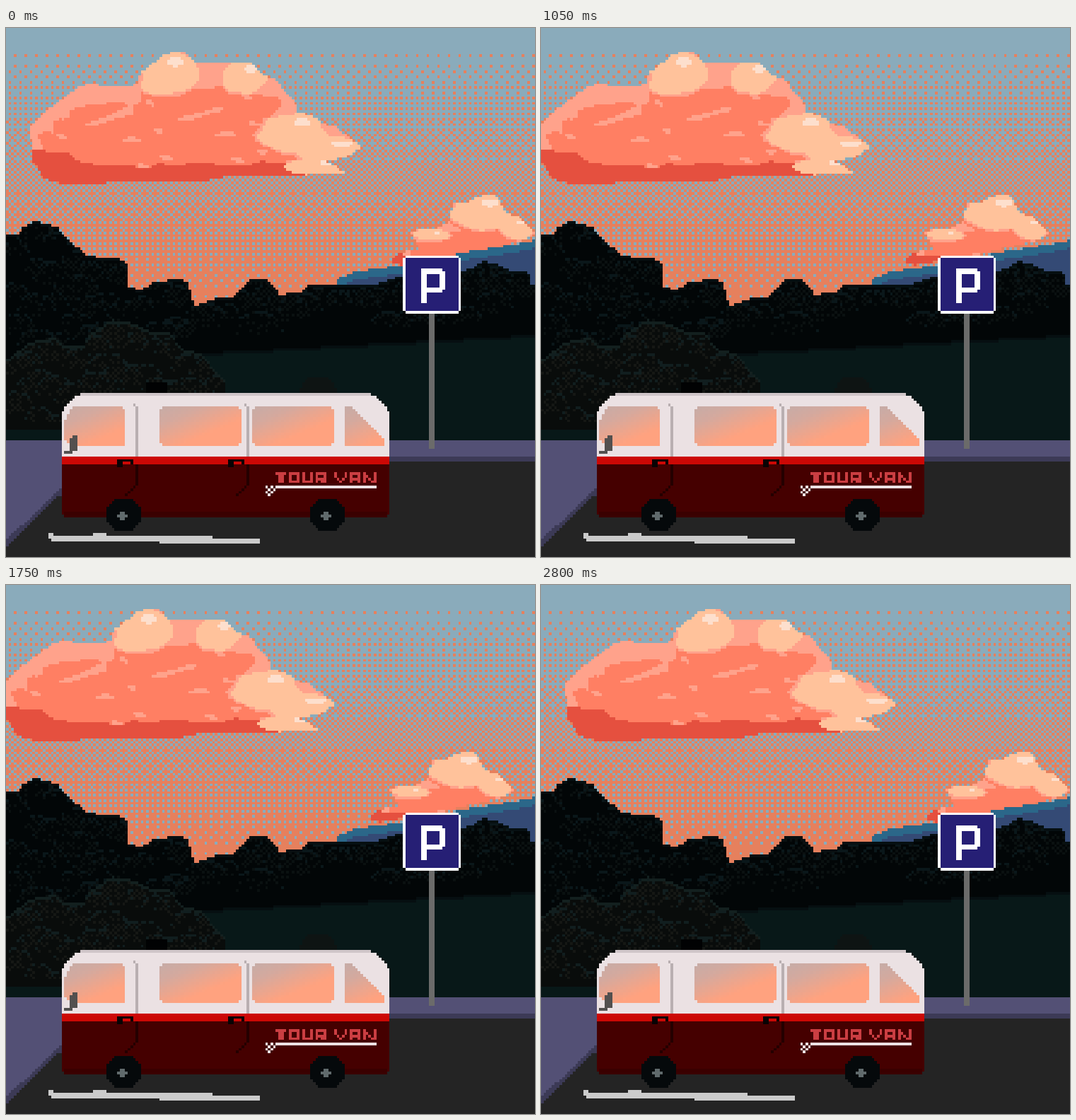
These frames come from a looping animation (748x748 px, 3150 ms). An HTML page with a canvas:

```html
<!DOCTYPE html>
<html lang="en">
<head>
<meta charset="utf-8">
<title>Tour van at dusk</title>
<style>
html, body { margin: 0; width: 100%; height: 100%; overflow: hidden; background: #8aabbb; }
canvas { display: block; width: 748px; height: 748px; image-rendering: pixelated; }
</style>
</head>
<body>
<canvas id="stage" width="200" height="200"></canvas>
<script>
const ctx = document.getElementById('stage').getContext('2d');
const SIZE = 200, UNIT = 3.74, STEP = 350, STEPS = 9;
const CORAL = '#ff7f63', SALMON = '#ffa28b', RED = '#e5503f', CREAM = '#ffc29b', PALE = '#fddfcd';

const snap = v => Math.round(v / UNIT);
const points = path => path.split(' ').map(p => p.split(',').map(v => v / UNIT));

function rect(x, y, w, h, color) {
  ctx.fillStyle = color;
  ctx.fillRect(x, y, w, h);
}

const dot = (x, y, color) => rect(x, y, 1, 1, color);

// Stage coordinates in, whole cells out.
function box(x0, y0, x1, y1, color) {
  const x = snap(x0), y = snap(y0);
  rect(x, y, snap(x1) - x, snap(y1) - y, color);
}

// Visits each cell of a polygon, top row first.
function cells(path, visit) {
  const pts = points(path), ys = pts.map(p => p[1]);
  for (let row = Math.floor(Math.min(...ys)); row <= Math.max(...ys); row++) {
    const y = row + 0.5, hits = [];
    pts.forEach(([ax, ay], i) => {
      const [bx, by] = pts[(i + 1) % pts.length];
      if ((ay <= y) !== (by <= y)) hits.push(ax + (y - ay) / (by - ay) * (bx - ax));
    });
    hits.sort((a, b) => a - b);
    for (let i = 0; i + 1 < hits.length; i += 2) {
      for (let x = Math.round(hits[i]); x < Math.round(hits[i + 1]); x++) visit(x, row);
    }
  }
}

const poly = (path, color) => cells(path, (x, y) => dot(x, y, color));

function seeded(seed) {
  return () => (seed = (seed * 16807) % 2147483647) / 2147483647;
}

// Smooth streaky noise between -1 and 1.
function streak(x, y) {
  return (Math.sin(x * 0.21 + y * 0.55) + Math.sin(y * 0.74 - x * 0.13 + 2 * Math.sin(x * 0.17))) / 2;
}

function bayer(x, y) {
  const pair = (a, b) => 2 * (a ^ b) + b;
  return 4 * pair(x & 1, y & 1) + pair(x >> 1 & 1, y >> 1 & 1);
}

function sky() {
  rect(0, 0, SIZE, SIZE, '#8aabbb');
  for (let y = 10; y < 112; y++) {
    const level = Math.floor((y - 9) / 102 * 16 + 1.2);
    for (let x = 0; x < SIZE; x++) {
      if (bayer(x + 1, y + 2) < level) dot(x, y, '#e6805d');
    }
  }
}

// Lit rim on top, dark belly below, bright puffs given as [x, y, rx, ry].
function cloud(shape, dx, rim, belly, puffs) {
  const top = {};
  cells(shape, (x, y) => {
    top[x] ??= y;
    const n = streak(x, y);
    let tone = y - top[x] < rim + 3 * n || n > 0.82 ? SALMON : CORAL;
    if (y > belly(x * UNIT) / UNIT + 1.5 * n) tone = RED;
    for (const [px, py, rx, ry] of puffs) {
      const u = (x * UNIT - px) / rx, v = (y * UNIT - py) / ry;
      const d = u * u + v * v + 0.25 * n;
      if (d < 1) tone = Math.hypot(u - 0.25, (v + 0.5) * 1.3) < 0.27 ? PALE : CREAM;
      else if (d < 1.25 && tone === CORAL) tone = SALMON;
    }
    dot(x - dx, y, tone);
  });
}

function clouds(phase) {
  cloud('34,138 64,112 103,83 118,79 162,84 186,79 190,63 224,38 236,34 255,35 268,50 345,49 366,68 380,72 408,105 412,118 440,127 450,136 463,138 504,168 478,184 450,187 482,206 310,211 285,216 80,220 54,214 38,187',
    [0, 4, 8, 10, 13][phase], 8, x => Math.min(165 + (x - 38) * 0.3, 191),
    [[228, 62, 42, 32], [335, 68, 32, 24], [405, 146, 48, 28], [460, 172, 52, 20], [440, 195, 48, 12]]);
  cloud('543,333 555,318 585,312 572,287 610,283 627,273 632,247 648,247 680,235 693,237 708,262 728,268 748,290 735,300 640,322 560,335',
    Math.round(2.6 * phase), 3, x => 315 + (x - 545) * 0.13,
    [[672, 258, 44, 25], [722, 281, 26, 16], [600, 291, 26, 9]]);
}

// Height in cells along a profile of key points.
function profile(path) {
  const pts = points(path);
  return x => {
    const i = pts.findIndex(p => p[0] > x);
    if (i < 1) return SIZE;
    const [ax, ay] = pts[i - 1], [bx, by] = pts[i];
    return Math.round(ay + (x - ax) / (bx - ax) * (by - ay));
  };
}

function land(top, bottom, color, drop = 0) {
  for (let x = 0; x < SIZE; x++) {
    const y = top(x + 0.5) + drop, h = bottom(x) - y;
    if (h > 0) rect(x, y, 1, h, color);
  }
}

// Scatters speckled leaf clumps with faint rims between two heights.
function foliage(top, bottom, rim, leaf, rnd) {
  const inside = (x, y) => y > top(x + 0.5) && y < bottom(x);
  for (let x = 3; x < SIZE; x += 4 + rnd() * 4) {
    const high = top(x), low = bottom(x);
    for (let y = high + 6; y < low; y += 10 + rnd() * 6) {
      const cx = Math.round(x), cy = Math.round(y), r = 5 + Math.floor(rnd() * 5);
      for (let i = -r; i <= r; i++) {
        const lift = Math.round(Math.sqrt(r * r - i * i) * 0.8);
        if (inside(cx + i, cy - lift) && rnd() < 0.6) dot(cx + i, cy - lift, rim);
        for (let j = 1 - lift; j < lift / 2; j++) {
          if ((cx + cy + i + j) % 2 === 0 && rnd() < 0.4 && inside(cx + i, cy + j)) dot(cx + i, cy + j, leaf);
        }
      }
    }
  }
}

function landscape() {
  const rnd = seeded(77), level = y => () => snap(y);
  const hills = profile('467,356 490,346 560,335 643,318 690,311 750,300');
  land(hills, level(400), '#2b6789');
  land(hills, level(400), '#344a75', 3);
  box(0, 420, 748, 584, '#081818');

  const trees = profile('0,292 18,293 24,282 42,273 72,281 90,303 118,323 160,325 171,335 174,368 195,369 210,359 248,355 258,362 266,394 302,381 320,383 345,357 368,356 388,377 415,374 430,361 520,363 575,345 655,342 675,330 690,332 714,345 738,344 742,364 750,364');
  const meadow = x => Math.round(127 - x * 0.055);
  land(trees, x => meadow(x) + 1, '#060f11');
  land(trees, meadow, '#020607', 1);
  foliage(trees, x => meadow(x) - 6, '#0a171a', '#0a1010', rnd);

  const bushes = profile('0,470 35,444 70,438 80,447 110,449 118,433 150,413 180,418 210,432 230,430 250,455 275,460 310,500 312,525');
  land(bushes, level(568), '#13201f');
  land(bushes, level(568), '#090c0b', 1);
  const shrub = profile('415,516 420,501 432,493 450,492 462,500 468,516');
  land(shrub, level(517), '#0e1413');
  foliage(bushes, level(560), '#111e1f', '#151714', rnd);
  box(198, 501, 228, 516, '#010203');
}

function road() {
  box(0, 583, 748, 748, '#242424');
  box(79, 583, 748, 613, '#3c3a56');
  box(79, 583, 748, 606, '#535075');
  poly('0,583 82,583 82,655 0,734', '#3c3a56');
  poly('0,583 82,583 82,645 0,725', '#535075');
  // Worn lane paint: start, end and row of each stroke.
  for (const [x0, x1, row] of [[16, 18, 191], [17, 58, 192], [33, 38, 191], [38, 70, 192], [58, 78, 193], [69, 78, 192], [77, 96, 193]]) {
    rect(x0, row, x1 - x0, 2, '#cbcbcb');
  }
}

function sign() {
  const white = '#fff';
  box(598, 404, 606, 595, '#6b6b6a');
  box(565, 322, 639, 404, white);
  box(561, 326, 643, 400, white);
  box(565, 326, 639, 400, '#261f75');
  rect(157, 91, 2, 13, white);
  rect(157, 91, 8, 2, white);
  rect(164, 92, 2, 7, white);
  rect(159, 98, 6, 2, white);
}

function shine(x) {
  const g = ctx.createLinearGradient(x, 143, x + 7, 160);
  g.addColorStop(0, '#c6aca7');
  g.addColorStop(0.35, '#d4a99e');
  g.addColorStop(0.9, '#ffa27f');
  return g;
}

function pane(x0, x1) {
  const tint = shine(snap(x0));
  box(x0 + UNIT, 535, x1 - UNIT, 591, tint);
  box(x0, 539, x1, 587, tint);
}

function door(x) {
  box(x - 4, 531, x, 535, '#b9afb1');
  box(x, 535, x + 4, 605, '#b9afb1');
  box(x, 617, x + 4, 647, '#240000');
  for (let i = 0; i < 4; i++) dot(snap(x) - 1 - i, 173 + i, '#240000');
  box(x - 26, 609, x - 3, 621, '#080304');
  box(x - 19, 613, x - 7, 617, '#cc0805');
  box(x - 19, 617, x - 3, 621, '#450000');
}

function wheel(cx) {
  const x = snap(cx - 24) + 1, y = 178;
  for (let i = 0; i < 12; i++) {
    const inset = Math.max(0, 3 - Math.min(i, 11 - i));
    rect(x + inset, y + i, 13 - 2 * inset, 1, '#05090b');
  }
  rect(x + 4, y + 6, 4, 1, '#606a6c');
  rect(x + 5, y + 5, 2, 3, '#606a6c');
}

const GLYPHS = {
  T: '#### .##. .##. .##.', O: '#### #..# #..# ####', U: '#..# #..# #..# ####',
  R: '#### #..# #### #.##', V: '#...# #...# .#.#. ..#..', A: '#### #..# #### #..#',
  N: '#...# ##..# #.#.# #..##'
};

function lettering(text, x, y, color) {
  for (const ch of text) {
    if (ch === ' ') { x += 2; continue; }
    const rows = GLYPHS[ch].split(' ');
    rows.forEach((row, j) => [...row].forEach((c, i) => c === '#' && dot(x + i, y + j, color)));
    x += rows[0].length + 1;
  }
}

function van() {
  const white = '#ebe1e3', left = 21, right = 145, roof = 138;
  for (let i = 0; i < 24; i++) {
    const t = Math.max(0, 1 - (i + 0.5) / 8);
    const inset = Math.round(8 * (1 - (1 - t ** 1.4) ** (1 / 1.4)));
    rect(left + inset, roof + i, right - left - 2 * inset, 1, i ? white : '#cfc5c8');
  }
  const front = shine(22), rear = shine(128);
  poly('94,535 165,535 168,539 168,587 165,591 94,591 82,582 82,556', front);
  poly('479,535 490,535 535,582 535,591 479,591', rear);
  pane(217, 333);
  pane(348, 464);
  box(79, 606, 542, 617, '#cc0805');
  box(79, 617, 542, 688, '#450000');
  box(83, 685, 538, 691, '#3a0000');
  door(183);
  door(340);
  poly('97,576 101,576 101,598 90,598 90,583', '#53504f');
  box(82, 598, 94, 602, '#53504f');
  lettering('TOUR VAN', 102, 168, '#cb3e42');
  box(381, 647, 524, 651, white);
  for (let j = 0; j < 4; j++) for (let i = 0; i < 4; i++) {
    if ((i + j) % 2 === 0 && i + j < 6 && j - i < 3) dot(98 + i, 173 + j, white);
  }
  wheel(164);
  wheel(452);
}

function draw(step) {
  sky();
  clouds(Math.min(step, STEPS - 1 - step));
  landscape();
  road();
  sign();
  van();
}

const start = performance.now();
let shown = -1;
function tick() {
  const step = Math.floor((performance.now() - start) / STEP) % STEPS;
  if (step !== shown) draw(shown = step);
  requestAnimationFrame(tick);
}
tick();
</script>
</body>
</html>
```
